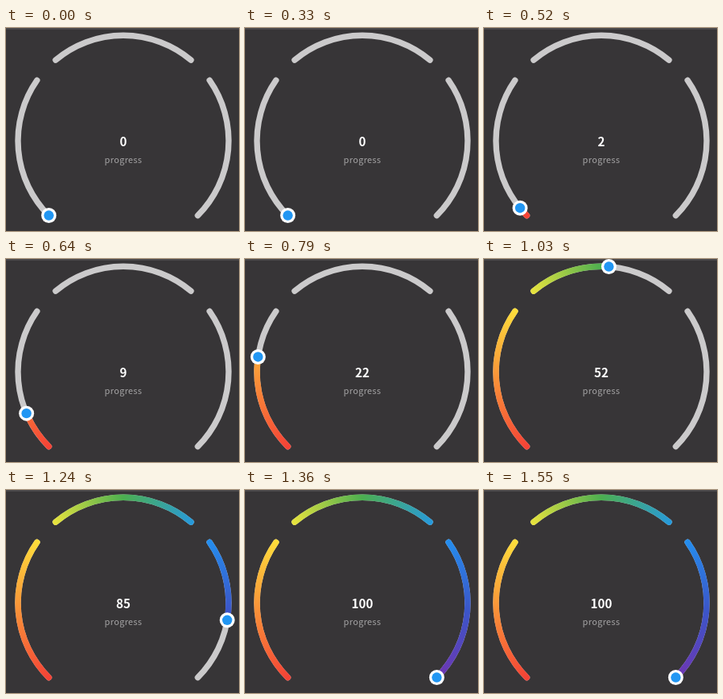
Animation of 292 by 254 pixels, one loop 1.64 s. Source, as an HTML page with a canvas:

```html
<!DOCTYPE html>
<html lang="en">
<head>
<meta charset="utf-8">
<title>Progress ring</title>
<style>
  html, body { margin: 0; width: 100%; height: 100%; overflow: hidden; background: #373537; }
  canvas { display: block; }
</style>
</head>
<body>
<canvas id="stage" width="292" height="254"></canvas>
<script>
const ctx = document.getElementById('stage').getContext('2d');
const LOOP = 1640, STEP = 30, STEP_OFFSET = 10;
const MOVE_START = 427, MOVE_TIME = 895, EASE_POWER = 1.67;
const CENTER = { x: 147, y: 141.2 };
const RADIUS = 132;
const START = 135, SWEEP = 80, GAP = 15, SEGMENTS = 3;
const FONT = '"Noto Sans CJK SC", "Noto Sans CJK JP", "Noto Sans", sans-serif';

const rad = deg => deg * Math.PI / 180;

const rainbow = ctx.createConicGradient(rad(90), CENTER.x, CENTER.y);
[
  [135, '#f44336'], [223, '#ffeb3b'], [270, '#4caf50'],
  [318, '#2196f3'], [365, '#3c55c8'], [405, '#6f35b2']
].forEach(([deg, color]) => rainbow.addColorStop((deg - 90) / 360, color));

// Accelerating run from 0 to 100, redrawn in fixed time steps.
function progressAt(time) {
  const tick = Math.floor((time - STEP_OFFSET) / STEP) * STEP + STEP_OFFSET;
  const u = Math.min(1, Math.max(0, (tick - MOVE_START) / MOVE_TIME));
  return 100 * u ** EASE_POWER;
}

function arc(from, length, style) {
  ctx.beginPath();
  ctx.arc(CENTER.x, CENTER.y, RADIUS, rad(from), rad(from + length));
  ctx.strokeStyle = style;
  ctx.stroke();
}

function disc(x, y, radius, color) {
  ctx.beginPath();
  ctx.arc(x, y, radius, 0, 2 * Math.PI);
  ctx.fillStyle = color;
  ctx.fill();
}

function label(text, y, font, color, spacing) {
  ctx.font = `${font} ${FONT}`;
  ctx.letterSpacing = spacing;
  ctx.fillStyle = color;
  ctx.fillText(text, CENTER.x, y);
}

function draw(progress) {
  ctx.fillStyle = '#373537';
  ctx.fillRect(0, 0, 292, 254);
  ctx.fillStyle = '#4b494b';
  ctx.fillRect(0, 0, 292, 2);

  ctx.lineWidth = 7.4;
  ctx.lineCap = 'round';
  const travelled = progress / 100 * SWEEP * SEGMENTS;
  let thumb = START;
  for (let i = 0; i < SEGMENTS; i++) {
    const from = START + i * (SWEEP + GAP);
    const filled = Math.min(SWEEP, travelled - i * SWEEP);
    arc(from, SWEEP, '#cbcacb');
    if (filled > 0) {
      arc(from, filled, rainbow);
      thumb = from + filled;
    }
  }

  const x = CENTER.x + RADIUS * Math.cos(rad(thumb));
  const y = CENTER.y + RADIUS * Math.sin(rad(thumb));
  disc(x, y, 9.5, '#ffffff');
  disc(x, y, 6.2, '#2196f3');

  ctx.textAlign = 'center';
  ctx.textBaseline = 'alphabetic';
  label(Math.round(progress), 148, 'bold 15.3px', '#ffffff', '0px');
  label('progress', 168.5, '11px', '#a3a2a3', '0.3px');
}

function frame() {
  draw(progressAt(performance.now() % LOOP));
  requestAnimationFrame(frame);
}
frame();
</script>
</body>
</html>
```
